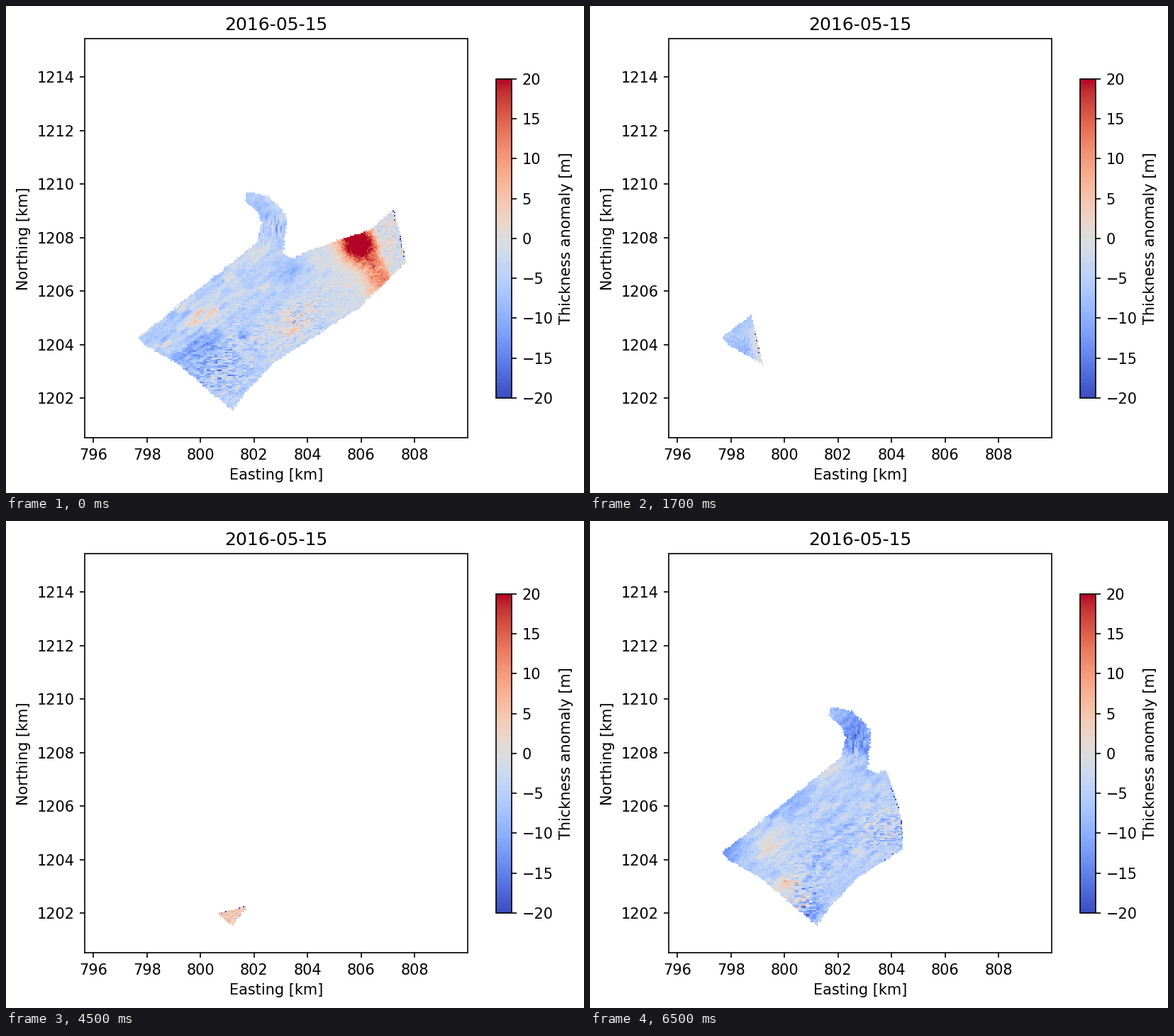
A matplotlib script that plays this animation: 815 px wide and 687 px high, repeating every 8000 ms.

```python
import numpy as np
import matplotlib.pyplot as plt
from matplotlib.animation import FuncAnimation
from matplotlib.path import Path

W, H, DPI = 815, 687, 150
PAD = 0.1 * DPI                    # white margin around all labels
COLS, ROWS = 286, 298              # 50 m cells
CELL = 1.881                       # pixels per cell
LEFT, TOP, MAP_H = 113.0, 47.0, ROWS * CELL

rng = np.random.default_rng(15)
X, Y = np.meshgrid(LEFT + (np.arange(COLS) + 0.5) * CELL,
                   TOP + (np.arange(ROWS) + 0.5) * CELL)


def flow(x, y):
    """Coordinates along and across the ice flow."""
    return 0.8 * x - 0.6 * y, 0.6 * x + 0.8 * y


ALONG, ACROSS = flow(X, Y)


def grain(std=1.0):
    return rng.normal(0, 1, X.shape) * std


def lattice(a, b):
    """Random value for each unit square of (a, b)."""
    table = rng.normal(0, 1, (331, 337))
    return table[np.floor(a).astype(int) % 331, np.floor(b).astype(int) % 337]


def streaks():
    wave = lattice(ALONG / 16, ACROSS / 4)
    for axis in (0, 1):
        wave = (np.roll(wave, 1, axis) + wave + np.roll(wave, -1, axis)) / 3
    return wave


def dashes():
    return lattice(X / 5, (Y + 0.15 * X) / CELL)


def stripes():
    return lattice((X + 0.15 * Y) / CELL, Y / 10)


def bump(x, y, length, width):
    """Soft hill, stretched along the flow."""
    a, c = flow(X - x, Y - y)
    return np.exp(-(a / length) ** 2 - (c / width) ** 2)


def ramp(t):
    return 1 / (1 + np.exp(-t))


def polygon(points):
    xy = np.c_[(X + grain(0.6)).ravel(), (Y + grain(0.6)).ravel()]
    return Path(points).contains_points(xy).reshape(X.shape)


def ribbon(points, start, end):
    """Thick line whose half width grows from start to end."""
    mask = np.zeros(X.shape, bool)
    px, py = X + grain(0.5), Y + grain(0.5)
    xs, ys = zip(*points)
    for t in np.linspace(0, 1, 120):
        step = t * (len(points) - 1)
        x = np.interp(step, range(len(xs)), xs)
        y = np.interp(step, range(len(ys)), ys)
        radius = start + (end - start) * t ** 0.6
        mask |= np.hypot(px - x, py - y) < radius
    return mask


def right_edge(mask):
    return mask & ~np.roll(mask, -1, 1)


def finish(values, mask, edge, chance):
    """Drop dark cells on the edge and hide all that is outside."""
    values[edge & (rng.random(X.shape) < chance)] = -20
    return np.ma.array(values, mask=~mask)


body = polygon([(188, 467), (250, 417), (358, 331), (394, 350), (404, 356),
                (435, 342), (515, 315), (547, 286), (565, 360), (500, 424),
                (380, 502), (337, 546), (321, 570), (245, 505), (198, 478)])
tongue = ribbon([(344, 270), (366, 281), (380, 302), (374, 340)], 6, 20)
glacier = body | tongue
arm = bump(374, 296, 36, 45)
arm_stripes = 4 * bump(378, 314, 20, 20)


def whole_glacier():
    v = -4.5 + 4 * ramp((ALONG - 125) / 14)
    v += 5.5 * bump(280, 437, 45, 11) + 3.5 * bump(350, 350, 35, 12)
    v += 4.5 * bump(405, 448, 45, 24) - 5 * bump(270, 490, 45, 35)
    v -= 4 * bump(402, 374, 28, 14) + 4 * arm
    band = X - 500 - 0.57 * (Y - 335)
    hot = 11 * np.exp(-(band / 24) ** 2) + 24 * bump(496, 334, 23, 22)
    beyond = ramp((X - 521 - 0.37 * (Y - 320)) / 1.8)
    hot *= 1 - beyond
    v += hot + grain(0.9 + 0.1 * np.minimum(hot, 14) + 1.5 * beyond)
    v += streaks() * (1.4 + 2 * bump(255, 450, 80, 60))
    v += dashes() * (4 * bump(415, 440, 45, 25) + 4 * bump(295, 520, 45, 42)
                     + 1.5 * bump(340, 470, 60, 50))
    v += stripes() * arm_stripes
    return finish(v, glacier, right_edge(glacier) & (X > 545) & (Y < 360), 0.25)


def west_corner():
    cut = 229 + 0.24 * (Y - 435)
    mask = glacier & (X < cut)
    v = -6 + 6.5 * ramp((X - cut + 10) / 2) * ramp((Y - 455) / 5)
    v += 1.3 * grain() + streaks() - 3 * bump(215, 483, 15, 9)
    return finish(v, mask, right_edge(mask) & (Y > 455) & (Y < 490), 0.2)


def narrow_band():
    mask = ribbon([(313, 560), (385, 481), (458, 412), (508, 370),
                   (540, 308), (564, 264), (564, 210), (556, 84)], 9, 9)
    rough = sum(np.exp(-((Y - y) / 18) ** 2) for y in (322, 432, 552))
    v = -3 * rough - 5 * np.exp(-((Y - 368) / 14) ** 2)
    v += 3 * np.exp(-((Y - 495) / 18) ** 2)
    v += 2.5 * np.exp(-((X - 551) / 6) ** 2) * (Y < 240)
    v += grain(0.5 + 1.2 * (Y > 290) + 5 * rough)
    edge = mask & ~(np.roll(mask, 1, 1) & np.roll(mask, -1, 1))
    runs = lattice(X / 12, Y / 9) > 0.95
    upper = (Y > 95) & (Y < 236)
    return finish(v, mask, edge, np.where(upper, runs, 0.4 * rough))


def south_tip():
    mask = polygon([(299, 553), (342, 541), (334, 552), (321, 570)])
    v = 4 + grain(2.6) + 1.5 * np.sin(X * 1.5) * np.sin(Y * 1.5)
    return finish(v, mask, mask & ~np.roll(mask, 1, 0) & (X < 336), 0.25)


def west_half():
    cut = 443 - 25 * np.clip((464 - Y) / 112, 0, 1) ** 2
    mask = glacier & (X < cut)
    v = -5 + 5.5 * bump(257, 455, 24, 26) + 4.5 * bump(345, 350, 28, 12)
    v += 6.5 * bump(280, 517, 20, 20) - 8 * bump(192, 468, 24, 24)
    v -= 3.5 * bump(280, 395, 60, 14) + 6 * bump(315, 552, 18, 18) + 8 * arm
    v += grain(0.9) + 1.8 * streaks()
    v += dashes() * (4.5 * bump(420, 435, 36, 30) + 5 * bump(300, 535, 30, 35)
                     + 2 * bump(335, 460, 60, 50))
    v += stripes() * arm_stripes
    return finish(v, mask, right_edge(mask) & (X > 415) & (Y > 365), 0.15)


maps = [whole_glacier(), west_corner(), narrow_band(), south_tip(), west_half()]

fig = plt.figure(figsize=(W / DPI, H / DPI), dpi=DPI)
ax, cax = fig.add_axes([0, 0, 1, 1]), fig.add_axes([0.8, 0, 0.1, 1])


def arrange(left, bottom, height, bar_left):
    """Place the map and, centred beside it, the shorter colour bar."""
    bar = 0.8 * height
    ax.set_position([left / W, bottom / H, height * COLS / ROWS / W, height / H])
    cax.set_position([bar_left / W, (bottom + 0.1 * height) / H,
                      bar / 20 / W, bar / H])


image = ax.imshow(maps[0], cmap="coolwarm", vmin=-20, vmax=20,
                  interpolation="nearest", aspect="auto",
                  extent=(795.675, 809.975, 1200.525, 1215.425))
ax.set_xticks(range(796, 809, 2))
ax.set_yticks(range(1202, 1215, 2))
ax.set_xlabel("Easting [km]")
ax.set_ylabel("Northing [km]")
ax.set_title("2016-05-15")
fig.colorbar(image, cax=cax, label="Thickness anomaly [m]",
             ticks=range(-20, 21, 5))

# Lay out once, measure the labels, then fit everything inside the margin.
bottom, bar_left = H - TOP - MAP_H, 689
arrange(LEFT, bottom, MAP_H, bar_left)
x0, y0, x1, y1 = np.array(fig.get_tightbbox().extents) * DPI
arrange(LEFT + PAD - x0, bottom + PAD - y0,
        MAP_H + (H - 2 * PAD) - (y1 - y0), bar_left + W - PAD - x1)


def update(frame):
    image.set_data(maps[(frame + 3) // 4])
    return [image]


animation = FuncAnimation(fig, update, frames=16, interval=500, repeat=True)
plt.show()
```
